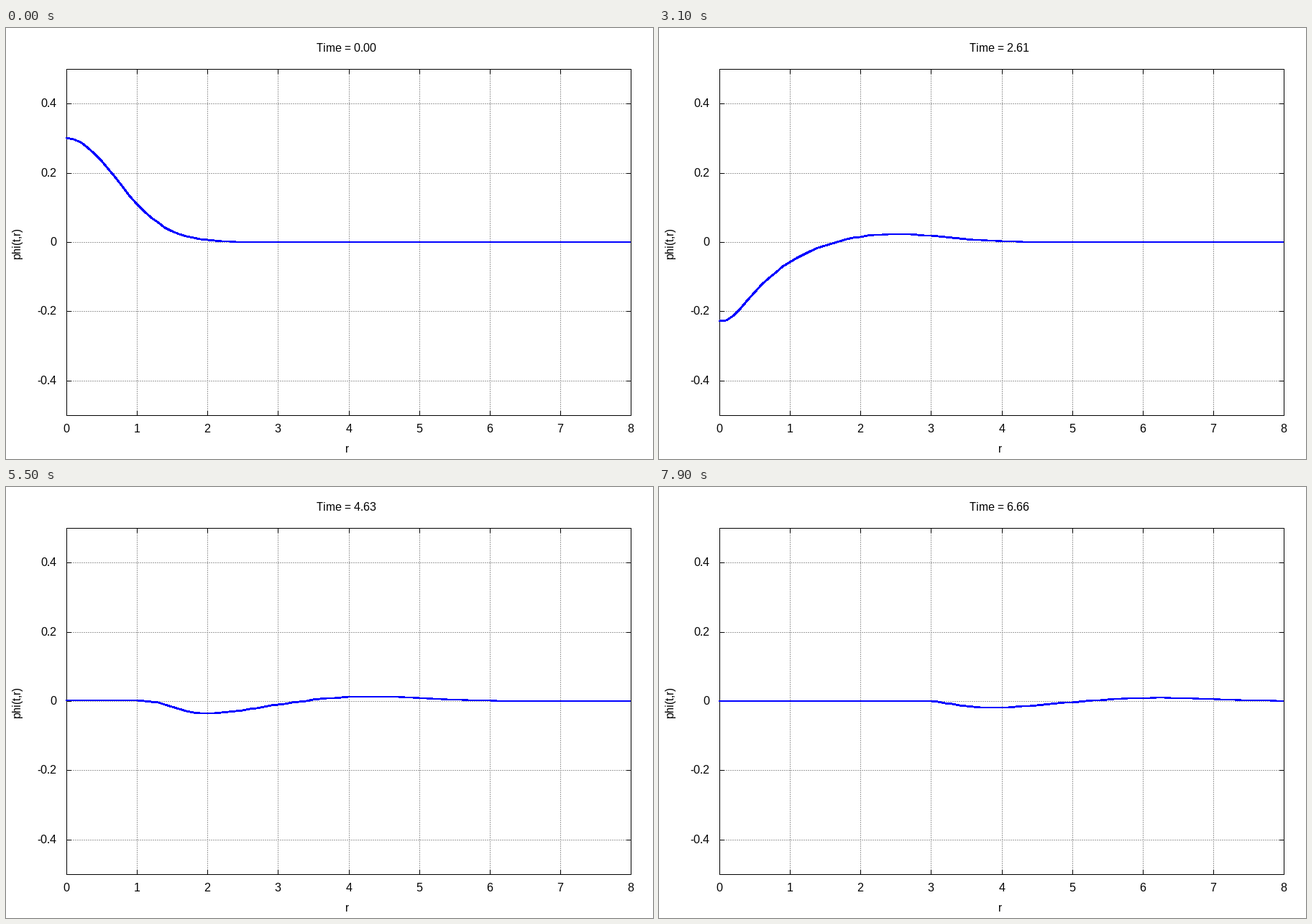
A matplotlib script for the animation above (8000 ms loop, 900 px wide and 600 px high).

```python
import numpy as np
import matplotlib.pyplot as plt
from matplotlib.animation import FuncAnimation

plt.rcParams["text.hinting"] = "default"
plt.rcParams["text.hinting_factor"] = 1

W, H, DPI = 900, 600, 100
FRAMES, INTERVAL = 80, 100
DT_FRAME, SUBSTEPS = 0.08425, 34
LEFT, RIGHT, TOP, BOTTOM = 84, 869, 57, 539
PX = 72 / DPI

# Massless scalar field coupled to gravity, polar-areal coordinates.
# Field and momentum live on cell centres, the gradient on cell edges.
AMP, DR, R_MAX = 0.3, 0.005, 10
edge = np.arange(int(R_MAX / DR) + 1) * DR
r = edge[:-1] + DR / 2
vol = np.diff(edge ** 3) / 3


def speed(grad, mom):
    """Coordinate light speed alpha / a on the edges, from the constraints."""
    g2 = grad ** 2
    s = 4 * np.pi * r * ((g2[1:] + g2[:-1]) / 2 + mom ** 2)
    e = np.exp(np.concatenate(([0], np.cumsum(s) * DR)))
    c = np.full_like(edge, 1 / e[-1])
    c[1:] = np.cumsum(e[1:] + e[:-1]) * DR / 2 / (edge[1:] * e[-1])
    return c


def rates(state):
    phi, mom = state
    grad = np.zeros_like(edge)
    grad[1:-1] = np.diff(phi) / DR
    c = speed(grad, mom)
    return np.array([(c[1:] + c[:-1]) / 2 * mom,
                     np.diff(edge ** 2 * c * grad) / vol])


def step(u, h):
    k1 = rates(u)
    k2 = rates(u + h / 2 * k1)
    k3 = rates(u + h / 2 * k2)
    k4 = rates(u + h * k3)
    return u + h / 6 * (k1 + 2 * k2 + 2 * k3 + k4)


def evolve():
    u = np.array([AMP * np.exp(-r ** 2), 0 * r])
    history = [u[0]]
    for _ in range(FRAMES - 1):
        for _ in range(SUBSTEPS):
            u = step(u, DT_FRAME / SUBSTEPS)
        history.append(u[0])
    return history


def to_x(v):
    return np.floor(LEFT + (RIGHT - LEFT) * v / 8 + 0.5)


def to_y(v):
    return np.floor(BOTTOM + (TOP - BOTTOM) * (v + 0.5) + 0.5)


fig = plt.figure(figsize=(W / DPI, H / DPI), dpi=DPI, facecolor="white")
ax = fig.add_axes([0, 0, 1, 1])
ax.set_xlim(0, W)
ax.set_ylim(H, 0)
ax.axis("off")


def rule(x0, y0, x1, y1, color="black", **kw):
    ax.plot([x0 + 0.5, x1 + 0.5], [y0 + 0.5, y1 + 0.5], color=color, lw=PX,
            antialiased=False, snap=False, solid_capstyle="projecting", **kw)


def label(x, y, s, ha="center", **kw):
    return ax.text(x, y, s, ha=ha, va="baseline", family="Liberation Sans",
                   size=16 * PX, color="black", **kw)


dots = dict(color="#a0a0a0", ls=(0, (2, 2)), dash_capstyle="butt", zorder=1)
for k in range(9):
    x = to_x(k)
    label(x, 563, str(k))
    if 0 < k < 8:
        rule(x, BOTTOM, x, TOP, **dots)
        rule(x, BOTTOM, x, BOTTOM - 6)
        rule(x, TOP, x, TOP + 6)
for v in (-0.4, -0.2, 0, 0.2, 0.4):
    y = to_y(v)
    label(70, y + 5, f"{v:g}", ha="right")
    rule(LEFT, y, RIGHT, y, **dots)
    rule(LEFT, y, LEFT + 6, y)
    rule(RIGHT, y, RIGHT - 6, y)
for x in (LEFT, RIGHT):
    rule(x, TOP, x, BOTTOM)
for y in (TOP, BOTTOM):
    rule(LEFT, y, RIGHT, y)

label(474.5, 591, "r")
label(20, 299, "phi(t,r)", rotation=90, rotation_mode="anchor")
title = label(432, 33, "", ha="left")
curve, = ax.plot([], [], color="#0000ff", lw=1.8 * PX, antialiased=False,
                 snap=False, solid_capstyle="butt", solid_joinstyle="round",
                 zorder=5)

history = evolve()
samples = np.arange(0, 8.01, 0.1)
xs = np.concatenate(([LEFT - 1], to_x(samples)))


def draw(i):
    ys = to_y(np.interp(samples, r, history[i]))
    curve.set_data(xs, np.concatenate((ys[:1], ys)))
    title.set_text(f"Time = {i * DT_FRAME:.2f}")
    return curve, title


anim = FuncAnimation(fig, draw, frames=FRAMES, interval=INTERVAL, repeat=True,
                     repeat_delay=0, blit=False)
plt.show()
```
